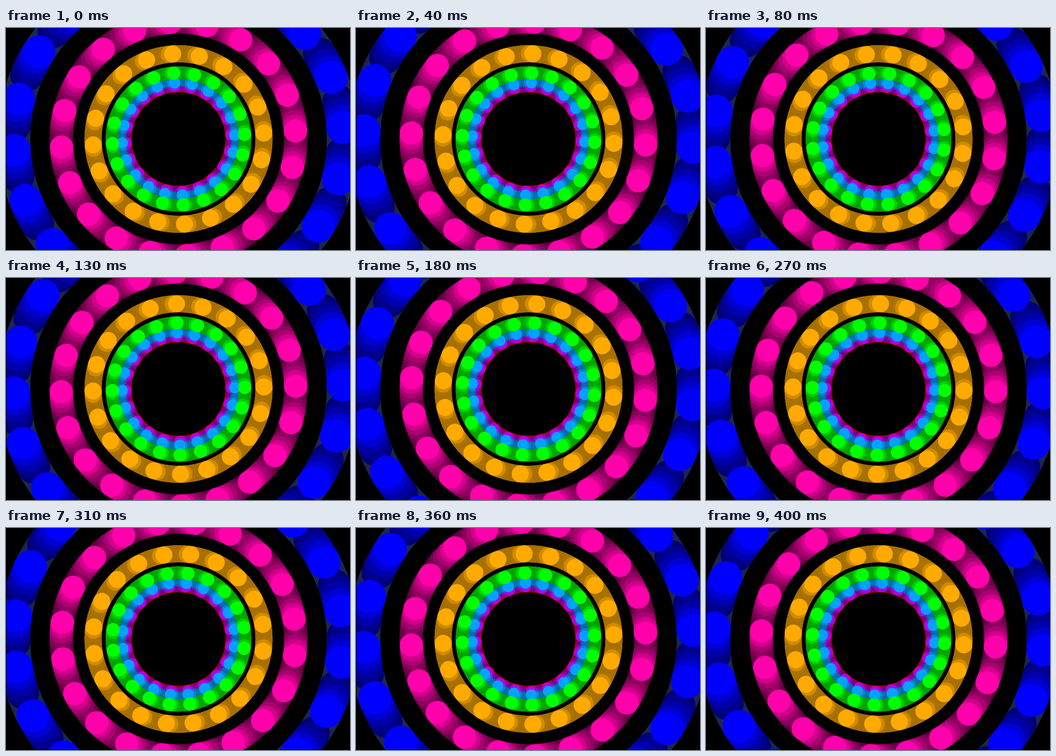
Recreate the animation shown at these times as an HTML page with a canvas. Size 660 by 427 pixels, loop 450 ms.

```html
<!DOCTYPE html>
<html lang="en">
<head>
<meta charset="utf-8">
<title>Spinning rings</title>
<style>
  html, body { margin: 0; width: 100%; height: 100%; overflow: hidden; background: #000; }
  canvas { display: block; width: 660px; height: 427px; }
</style>
</head>
<body>
<canvas id="stage" width="660" height="427"></canvas>
<script>
  const ctx = document.getElementById('stage').getContext('2d');
  const TAU = Math.PI * 2;
  const CX = 331, CY = 213.5;
  const LOOP = 450;
  const STARTS = [0, 40, 80, 130, 180, 230, 270, 310, 360, 400];
  const DOTS = 20;
  const PHASE = -3.95 * Math.PI / 180;
  const STEP = 0.12;   // turn per pose, radians
  const TRAIL = 0.04;  // turn between two ghosts of a trail
  const GHOSTS = 16;
  const FADE = 0.82;

  // Innermost first; the orbits widen with the cube of the index.
  const rings = [
    { rgb: [255, 0, 0], floor: 0.62 },
    { rgb: [170, 0, 255], floor: 0.62 },
    { rgb: [0, 162, 255], floor: 0.68 },
    { rgb: [0, 255, 0], floor: 0.63 },
    { rgb: [255, 170, 0], floor: 0.65 },
    { rgb: [255, 0, 170], floor: 0.36 },
    { rgb: [0, 0, 255], floor: 0.45, ghosts: 4, band: '#1b2550' }
  ].map((ring, n) => {
    const orbit = 100 + n ** 3;
    return { ghosts: GHOSTS, ...ring, orbit, size: orbit / 10 };
  });

  const shade = (rgb, level) => `rgb(${rgb.map(c => Math.round(c * level)).join()})`;

  function drawBand(ring) {
    ctx.beginPath();
    ctx.arc(CX, CY, ring.orbit, 0, TAU);
    ctx.lineWidth = ring.size * 2;
    ctx.strokeStyle = ring.band || shade(ring.rgb, ring.floor);
    ctx.stroke();
  }

  function drawDots(ring, turn, level) {
    ctx.fillStyle = shade(ring.rgb, level);
    ctx.beginPath();
    for (let i = 0; i < DOTS; i++) {
      const a = turn + i * TAU / DOTS;
      const x = CX + ring.orbit * Math.sin(a);
      const y = CY - ring.orbit * Math.cos(a);
      ctx.moveTo(x + ring.size, y);
      ctx.arc(x, y, ring.size, 0, TAU);
    }
    ctx.fill();
  }

  function draw(pose) {
    const turn = PHASE + pose * STEP;
    ctx.fillStyle = '#000';
    ctx.fillRect(0, 0, 660, 427);
    rings.forEach(drawBand);
    // Oldest ghosts of every ring first, so newer dots cover older neighbours.
    for (let k = GHOSTS; k >= 0; k--) {
      for (const ring of rings) {
        if (k <= ring.ghosts) {
          drawDots(ring, turn - k * TRAIL, Math.max(ring.floor, FADE ** k));
        }
      }
    }
    ctx.fillStyle = '#000';
    ctx.fillRect(0, 0, 1, 427);
  }

  let shown = -1;
  const origin = performance.now();
  function tick() {
    const t = Math.max(0, performance.now() - origin) % LOOP;
    const pose = STARTS.filter(s => s <= t).length - 1;
    if (pose !== shown) draw(shown = pose);
    requestAnimationFrame(tick);
  }
  tick();
</script>
</body>
</html>
```
